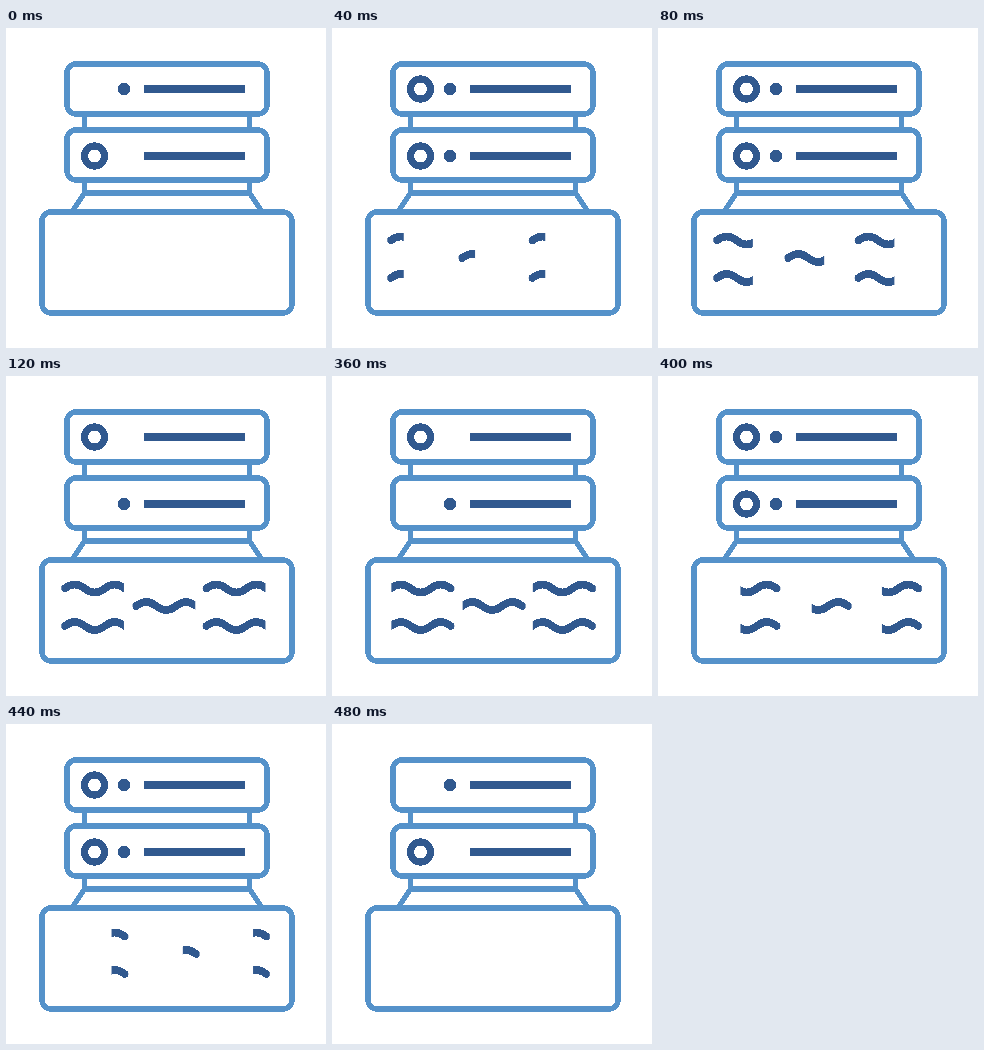
These frames come from a looping animation (320x320 px, 1000 ms). An HTML page:

```html
<!DOCTYPE html>
<html lang="en">
<head>
<meta charset="utf-8">
<title>Server rack</title>
<style>
  html, body { margin: 0; width: 100%; height: 100%; overflow: hidden; background: #fff; }
  svg { display: block; width: 100vw; height: 100vh; shape-rendering: crispEdges; }
  .frame { fill: none; stroke: #5592ca; stroke-width: 5.5; }
  .detail { fill: none; stroke: #31598f; stroke-width: 8; }
  .ring { stroke-width: 7.2; }
  .dot { fill: #31598f; stroke: none; }
</style>
</head>
<body>
<svg viewBox="0 0 320 320">
  <defs>
    <clipPath id="window"><rect id="reveal" y="-9" height="18"/></clipPath>
    <g id="wave" clip-path="url(#window)">
      <path d="M0 0Q10-8 20 0T40 0T60 0" stroke-width="7.6" stroke-linecap="round"/>
    </g>
  </defs>
  <g class="frame">
    <rect x="61" y="36" width="200" height="50" rx="9"/>
    <rect x="61" y="102" width="200" height="50" rx="9"/>
    <rect x="36" y="184" width="250" height="101" rx="9"/>
    <path d="M78.5 87V101M243.5 87V101M78.5 152V165H243.5V152M78.5 165L66.5 183M243.5 165L255.5 183"/>
  </g>
  <g class="detail">
    <path d="M138 61H239M138 128H239"/>
    <g id="lit">
      <circle class="ring" cx="88.5" cy="61" r="10"/>
      <circle class="dot" cx="118" cy="128" r="6.3"/>
    </g>
    <g id="idle">
      <circle class="dot" cx="118" cy="61" r="6.3"/>
      <circle class="ring" cx="88.5" cy="128" r="10"/>
    </g>
    <use href="#wave" x="58.8" y="212.5"/>
    <use href="#wave" x="58.8" y="250"/>
    <use href="#wave" x="130.1" y="230"/>
    <use href="#wave" x="200.3" y="212.5"/>
    <use href="#wave" x="200.3" y="250"/>
  </g>
</svg>
<script>
  const LOOP = 1000, STEP = 40, SWEEP = 116, ENTER = 11.5, LEAVE = 353;
  const WAVE_LEFT = -3.5, WAVE_WIDTH = 67;
  const [reveal, lit, idle] = ['reveal', 'lit', 'idle'].map(id => document.getElementById(id));

  const progress = (t, start) => Math.min(1, Math.max(0, (t - start) / SWEEP));
  const show = (el, on) => el.setAttribute('visibility', on ? 'visible' : 'hidden');

  function draw() {
    const t = Math.floor(performance.now() % LOOP / STEP) * STEP;
    const left = progress(t, LEAVE);
    const active = progress(t, ENTER) - left;

    // Waves are wiped in, then wiped out, from left to right.
    reveal.setAttribute('x', WAVE_LEFT + WAVE_WIDTH * left);
    reveal.setAttribute('width', WAVE_WIDTH * active);

    // Both pairs of lights are on while they swap.
    show(lit, active > 0.2);
    show(idle, active < 0.8);
    requestAnimationFrame(draw);
  }
  draw();
</script>
</body>
</html>
```
